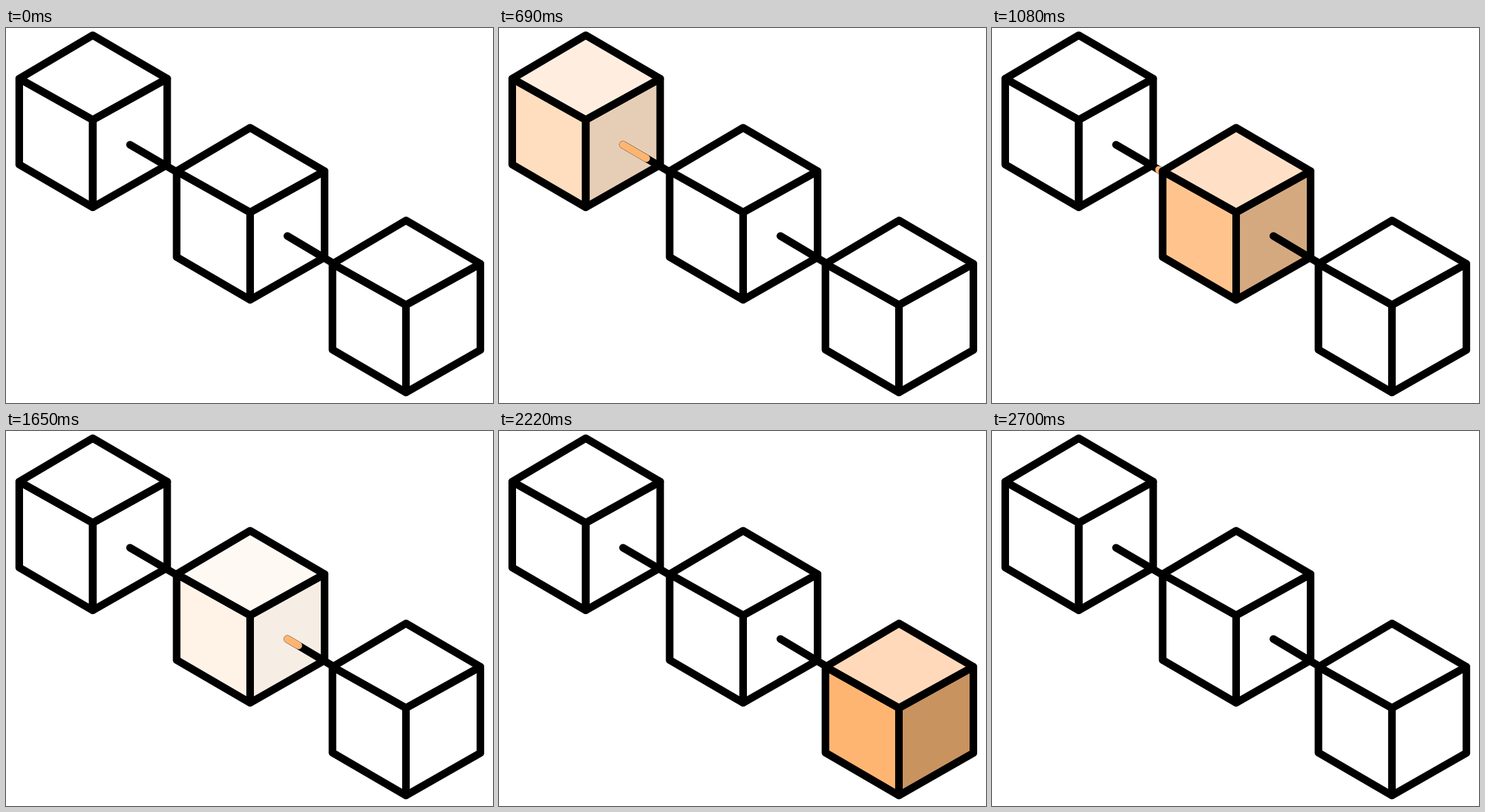
Recreate the animation shown at these times as an HTML page with a canvas. Size 772x596 px, loop 2.73 s.

```html
<!DOCTYPE html>
<html>
<head>
<meta charset="utf-8">
<style>
  html, body { margin: 0; width: 100%; height: 100%; overflow: hidden; background: #fff; }
  canvas { display: block; }
</style>
</head>
<body>
<canvas id="stage" width="772" height="596"></canvas>
<script>
const ctx = document.getElementById('stage').getContext('2d');
const STEP = 30, STEPS = 91;

// Corners of one cube, relative to the first cube
const top_ = [137.5, 11.5], left = [21, 80.5], right = [255.5, 80.5], mid = [137.5, 146],
      lowLeft = [21, 217], low = [137.5, 285], lowRight = [255.5, 217.5];
const faces = [
  ['#ffd9b9', [top_, right, mid, left]],
  ['#ffb572', [left, mid, low, lowLeft]],
  ['#c99360', [right, lowRight, low, mid]]
];

// fade: steps of fade-in start, full, fade-out start, gone
const cubes = [
  { x: 0, y: 0, fade: [0, 10, 11, 33] },
  { x: 249.5, y: 147, fade: [29, 37.8, 40, 58] },
  { x: 496.5, y: 294.3, fade: [57, 74, 76, 90] }
];
const links = [
  { from: [196.5, 185.5], to: [271, 229], start: 15.9 },
  { from: [446, 330.5], to: [518, 373.5], start: 51.5 }
];
const TRAVEL = 14.25, TAIL_DELAY = 7.1;

const ramp = (t, a, b) => Math.min(1, Math.max(0, (t - a) / (b - a)));
const mix = (a, b, k) => a.map((v, i) => v + (b[i] - v) * k);

function trace(points) {
  ctx.beginPath();
  points.forEach(p => ctx.lineTo(...p));
}

function strokeLine(a, b, color, width) {
  trace([a, b]);
  ctx.strokeStyle = color;
  ctx.lineWidth = width;
  ctx.stroke();
}

function drawCube({ x, y, fade: [a, b, c, d] }, t) {
  ctx.save();
  ctx.translate(x, y);
  ctx.strokeStyle = '#000';
  ctx.lineWidth = 12;
  for (const [color, points] of faces) {
    trace(points);
    ctx.closePath();
    ctx.globalAlpha = ramp(t, a, b) * (1 - ramp(t, c, d));
    ctx.fillStyle = color;
    ctx.fill();
  }
  ctx.globalAlpha = 1;
  for (const [, points] of faces) {
    trace(points);
    ctx.closePath();
    ctx.stroke();
  }
  ctx.restore();
}

function drawLink({ from, to, start }, t) {
  strokeLine(from, to, '#000', 12);
  const head = ramp(t, start, start + TRAVEL);
  const tail = ramp(t, start + TAIL_DELAY, start + TAIL_DELAY + TRAVEL);
  if (head > tail) strokeLine(mix(from, to, tail), mix(from, to, head), '#ffb572', 11.5);
}

function draw() {
  const t = Math.floor(performance.now() / STEP) % STEPS;
  ctx.clearRect(0, 0, 772, 596);
  ctx.lineCap = ctx.lineJoin = 'round';
  cubes.forEach((cube, i) => {
    drawCube(cube, t);
    if (links[i]) drawLink(links[i], t);
  });
  requestAnimationFrame(draw);
}
draw();
</script>
</body>
</html>
```
